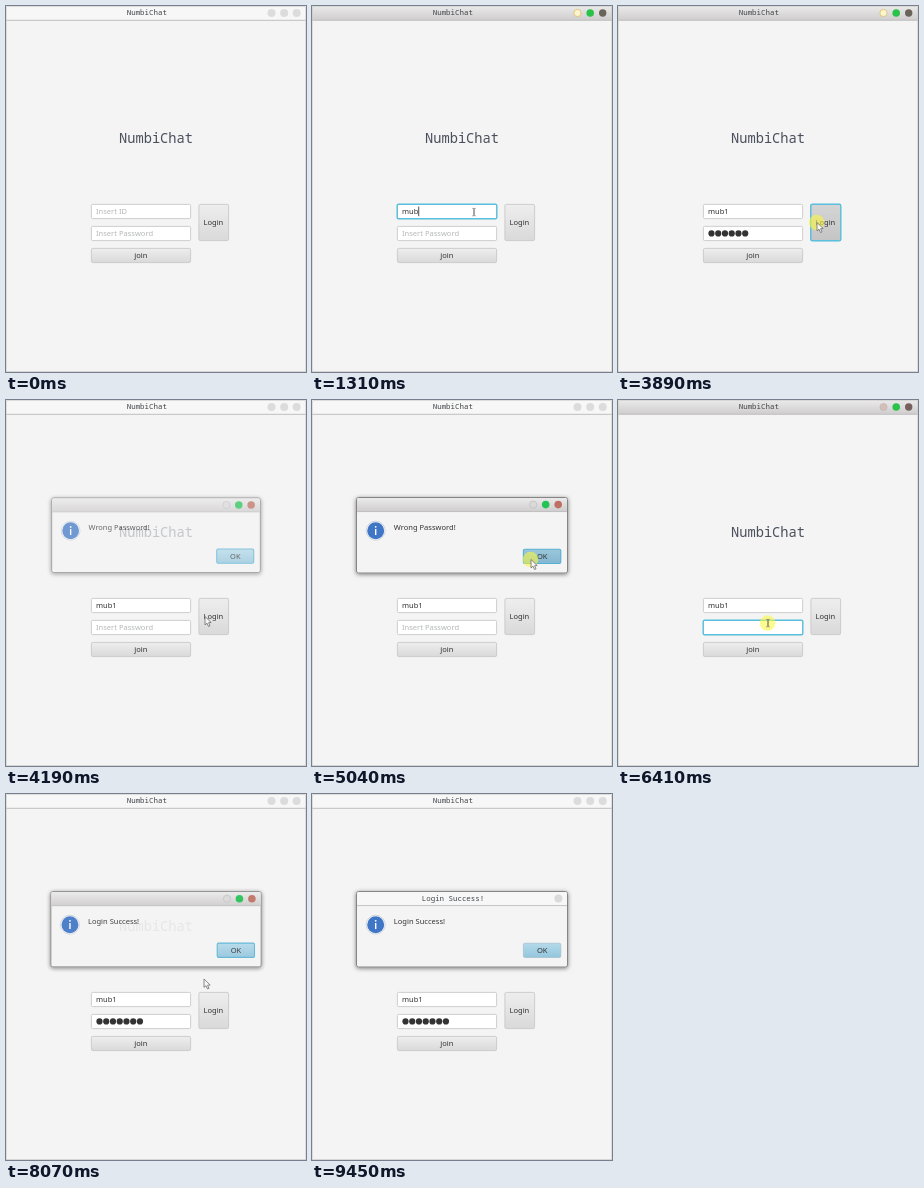
These frames come from a looping animation (300x366 px, 9.52 s). An HTML page:

```html
<!DOCTYPE html>
<html lang="en">
<head>
<meta charset="utf-8">
<title>Login demo</title>
<style>
  html, body { margin: 0; width: 100%; height: 100%; overflow: hidden; background: #f4f4f4; }
  svg { display: block; width: 100vw; height: 100vh; }
  text { font: 7.55px "Noto Sans", sans-serif; fill: #333; }
  .mid { text-anchor: middle; }
  .mono { font-family: "Noto Sans Mono", monospace; font-size: 7.45px; fill: #414548; text-anchor: middle; }
  .brand { font-size: 13.7px; font-weight: 500; fill: #4a4f5c; }
  .prompt { fill: #b4b6b8; }
  .edge { stroke: #c9c9c9; stroke-width: .9; }
  .ring { fill: none; stroke: #5bbfdd; stroke-width: 1.4; }
</style>
</head>
<body>
<svg viewBox="0 0 300 366">
  <defs>
    <linearGradient id="bar" x2="0" y2="1"><stop stop-color="#ebeaea"/><stop offset="1" stop-color="#cfcdcd"/></linearGradient>
    <linearGradient id="btn" x2="0" y2="1"><stop stop-color="#eeeeee"/><stop offset="1" stop-color="#d9d9d9"/></linearGradient>
    <linearGradient id="blue" x2="0" y2="1"><stop stop-color="#b4daea"/><stop offset="1" stop-color="#94c5dd"/></linearGradient>
    <filter id="shadow" x="-10%" y="-20%" width="120%" height="150%">
      <feDropShadow dx="0" dy="1" stdDeviation="2.3" flood-color="#000" flood-opacity=".5"/>
    </filter>
  </defs>

  <rect width="300" height="366" fill="#f4f4f4"/>
  <rect width="300" height="14" fill="#f7f7f7"/>
  <g fill="#dcdcdc"><circle cx="265.5" cy="7" r="4"/><circle cx="278.2" cy="7" r="4"/><circle cx="290.7" cy="7" r="4"/></g>
  <g id="mainBar">
    <rect width="300" height="14" fill="url(#bar)"/>
    <circle id="minDot" cx="265.5" cy="7" r="3.6" stroke-width=".7"/>
    <circle cx="278.2" cy="7" r="3.8" fill="#2ac34a"/>
    <circle id="closeDot" cx="290.7" cy="7" r="3.7"/>
  </g>
  <text class="mono" x="140.8" y="9.3">NumbiChat</text>
  <path d="M0 14.3H300" stroke="#b9b9b9" stroke-width=".9"/>
  <path d="M.3 366V2Q.3.3 2 .3H298Q299.7.3 299.7 2V366M0 365.5H300" fill="none" stroke="#cbcbcb" stroke-width=".7"/>

  <text class="mono brand" x="150" y="136.7">NumbiChat</text>

  <g class="edge" fill="#fff">
    <rect x="85.4" y="198.4" width="99.2" height="14.2" rx="1.2"/>
    <rect x="85.4" y="220.4" width="99.2" height="14.2" rx="1.2"/>
    <rect x="85.4" y="242.4" width="99.2" height="14.2" rx="1.5" fill="url(#btn)"/>
    <rect x="192.9" y="198.4" width="29.7" height="36.2" rx="1.5" fill="url(#btn)"/>
  </g>
  <rect id="loginTint" x="193" y="198.5" width="29.5" height="36" rx="1.5"/>
  <rect class="ring" id="idRing" x="85.2" y="198.2" width="99.6" height="14.6" rx="1.3"/>
  <rect class="ring" id="pwRing" x="85.2" y="220.2" width="99.6" height="14.6" rx="1.3"/>
  <rect class="ring" id="loginRing" x="192.7" y="198.2" width="30.1" height="36.6" rx="1.6"/>
  <text class="prompt" id="idPrompt" x="90" y="208.2">Insert ID</text>
  <text class="prompt" id="pwPrompt" x="90" y="230.2">Insert Password</text>
  <text id="idText" x="90" y="208.2"></text>
  <g id="dots" fill="#333"></g>
  <rect id="caret" width=".8" height="9.6" fill="#222"/>
  <text class="mid" x="134.8" y="252.2">join</text>
  <text class="mid" x="207.4" y="219.2">Login</text>

  <g id="dialog">
    <rect x="44.5" y="97.5" width="211" height="75.5" rx="2" fill="#f4f4f4" stroke="#858585" filter="url(#shadow)"/>
    <rect id="dlgBar" x="45" y="98" width="210" height="13.5" rx="1.5"/>
    <path d="M45 111.6H255" stroke="#b5b5b5" stroke-width=".8"/>
    <g id="dlgDots">
      <circle cx="221.2" cy="104.6" r="3.6" fill="#d9d9d9" stroke="#bdbdbd" stroke-width=".7"/>
      <circle cx="233.7" cy="104.6" r="3.8" fill="#25c254"/>
      <circle cx="246.2" cy="104.6" r="3.8" fill="#be7062"/>
    </g>
    <g id="dlgIdle">
      <text class="mono" x="141" y="107.2">Login Success!</text>
      <circle cx="246.4" cy="104.6" r="4" fill="#dadada"/>
    </g>
    <circle cx="63.7" cy="130.7" r="9.5" fill="#fff" stroke="#c4cbd6" stroke-width=".8"/>
    <circle cx="63.7" cy="130.7" r="8.5" fill="#3f77c6"/>
    <path d="M63.7 129V135" stroke="#fff" stroke-width="1.4"/>
    <circle cx="63.7" cy="126.8" r=".9" fill="#fff"/>
    <text id="message" x="81.8" y="129.8"></text>
    <rect id="ok" x="211.4" y="149.2" width="37.4" height="14.3" rx="1.4" fill="url(#blue)"/>
    <rect id="okTint" x="211.6" y="149.4" width="37" height="14" rx="1.4" fill="#4f8caa"/>
    <text class="mid" x="230.2" y="159.1">OK</text>
  </g>

  <g id="pointer">
    <circle id="halo" cx="-.4" r="7.8" fill="#fbf83c"/>
    <path id="arrow" d="M0 0V8.4L2 6.7L3.5 10L5 9.3L3.6 6.2L6.2 6Z" fill="#f6f6f6" stroke="#666" stroke-width=".75"/>
    <path id="beam" d="M-1.7-3.7Q0-3.7 0-3V3.2Q0 3.9-1.7 3.9M1.7-3.7Q0-3.7 0-3V3.2Q0 3.9 1.7 3.9" fill="none" stroke="#666" stroke-width=".7"/>
  </g>
</svg>

<script>
const LOOP = 9520;
const el = {};
document.querySelectorAll('svg [id]').forEach(n => el[n.id] = n);

const set = (node, attrs) => { for (const k in attrs) node.setAttribute(k, attrs[k]); };
const show = (node, on) => set(node, { visibility: on ? 'visible' : 'hidden' });
const ramp = (t, a, b) => Math.min(1, Math.max(0, (t - a) / (b - a)));
const ease = p => p * p * (3 - 2 * p);
const within = (t, a, b) => t >= a && t < b;
const latest = (list, t) => list.filter(s => s[0] <= t).pop();

// time, x, y
const path = [
  [30, 232, 341], [380, 162, 206], [2260, 162, 206], [2480, 164, 227],
  [3540, 164, 227], [3760, 199, 216.5], [4510, 199, 216.5], [4900, 219, 159.5],
  [5180, 219, 159.5], [5460, 206, 199], [5550, 206, 199], [5780, 152, 206],
  [6170, 152, 206], [6330, 150, 223], [7400, 150, 223], [7650, 198, 214],
  [7940, 198, 214], [8070, 198, 185], [8120, 198, 185], [8520, 230, 156],
  [8940, 230, 156], [9230, 254, 372]
];
const clicks = [480, 2560, 3800, 4980, 5840, 6350, 7700];
const focus = [[0, ''], [480, 'id'], [2560, 'pw'], [3800, 'login'], [5840, 'id'], [6350, 'pw'], [7700, 'login']];
const user = [[0, ''], [1090, 'm'], [1230, 'mu'], [1310, 'mub'], [1530, 'mub1']];
const secret = [
  [0, 0], [2700, 1], [2800, 2], [2910, 3], [3220, 4], [3280, 5], [3330, 6],
  [4040, 0], [6650, 1], [6770, 3], [7150, 4], [7220, 5], [7280, 6], [7340, 7]
];
const DOT = 6.74;

for (let i = 0; i < 7; i++) {
  const dot = document.createElementNS('http://www.w3.org/2000/svg', 'circle');
  set(dot, { cx: 93.5 + i * DOT, cy: 227.4, r: 3.1 });
  el.dots.append(dot);
}

function pointerAt(t) {
  const i = path.findIndex(k => k[0] > t);
  if (i < 1) return path[i < 0 ? path.length - 1 : 0].slice(1);
  const [a, ax, ay] = path[i - 1], [b, bx, by] = path[i];
  const p = ease(ramp(t, a, b));
  return [ax + (bx - ax) * p, ay + (by - ay) * p];
}

function drawForm(t, field, active, x, y) {
  const [typedAt, name] = latest(user, t);
  const [dotsAt, count] = latest(secret, t);
  el.idText.textContent = name;
  [...el.dots.children].forEach((d, i) => show(d, i < count));
  show(el.idPrompt, t < 480);
  show(el.pwPrompt, !count && field[1] !== 'pw');
  for (const f of ['id', 'pw', 'login'])
    set(el[f + 'Ring'], { opacity: field[1] === f ? active : 0 });

  const onId = field[1] === 'id';
  const since = t - Math.max(field[0], onId ? typedAt : dotsAt);
  const blinkOn = since % 1000 < 500 || within(t, 900, 1090);
  show(el.caret, (onId || field[1] === 'pw') && blinkOn && !within(t, 6350, 6490));
  set(el.caret, {
    x: onId ? 90 + (name ? el.idText.getComputedTextLength() : 0) : 90 + count * DOT,
    y: onId ? 200.6 : 222.6
  });

  const hover = within(x, 192, 223) && within(y, 198, 235) && active > .5;
  const pressed = within(t, 3800, 3920) || within(t, 7700, 7820);
  set(el.loginTint, { fill: pressed ? '#888' : '#fff', opacity: pressed ? .25 : hover ? .3 : 0 });
}

function drawDialog(t, x, y) {
  const alpha = t < 6000
    ? ramp(t, 4036, 4250) * (1 - ramp(t, 5130, 5320))
    : ramp(t, 7868, 8088);
  const scale = .96 + .04 * alpha;
  const idle = t >= 9450;
  show(el.dialog, alpha > 0);
  set(el.dialog, {
    opacity: alpha,
    transform: `translate(150 135) scale(${scale}) translate(-150 -135)`
  });
  set(el.dlgBar, { fill: idle ? '#f7f7f7' : 'url(#bar)' });
  set(el.dlgDots, { opacity: idle ? 0 : 1 });
  set(el.dlgIdle, { opacity: idle ? 1 : 0 });
  el.message.textContent = t < 6000 ? 'Wrong Password!' : 'Login Success!';
  const hover = within(x, 211, 249) && within(y, 149, 164);
  const pressed = within(t, 4980, 5130);
  set(el.ok, { stroke: idle ? '#a3bfcc' : '#5ab4d5', 'stroke-width': idle ? .7 : 1.1 });
  set(el.okTint, { opacity: pressed ? .25 : hover ? .08 : 0 });
}

function render(t) {
  const [x, y] = pointerAt(t);
  const field = latest(focus, t);
  const active = ramp(t, 480, 620) - ramp(t, 3980, 4120) + ramp(t, 5270, 5440) - ramp(t, 7850, 7990);
  set(el.mainBar, { opacity: active });
  const late = t > 5200;
  set(el.minDot, { fill: late ? '#d2bfba' : '#fcf4cc', stroke: late ? '#c8b6b2' : '#d9b956' });
  set(el.closeDot, { fill: late ? '#765f5c' : '#69645a' });

  drawForm(t, field, active, x, y);
  drawDialog(t, x, y);

  const overField = within(x, 85, 185) && (within(y, 198, 213) || within(y, 220, 235));
  show(el.pointer, within(t, 30, 9230));
  set(el.pointer, { transform: `translate(${x} ${y})` });
  set(el.beam, { opacity: overField ? 1 : 0 });
  set(el.arrow, { opacity: overField ? 0 : 1 });
  set(el.halo, { opacity: clicks.some(c => within(t, c, c + 130)) ? .58 : 0 });
}

const start = performance.now();
function frame() {
  render((performance.now() - start) % LOOP);
  requestAnimationFrame(frame);
}
frame();
</script>
</body>
</html>
```
